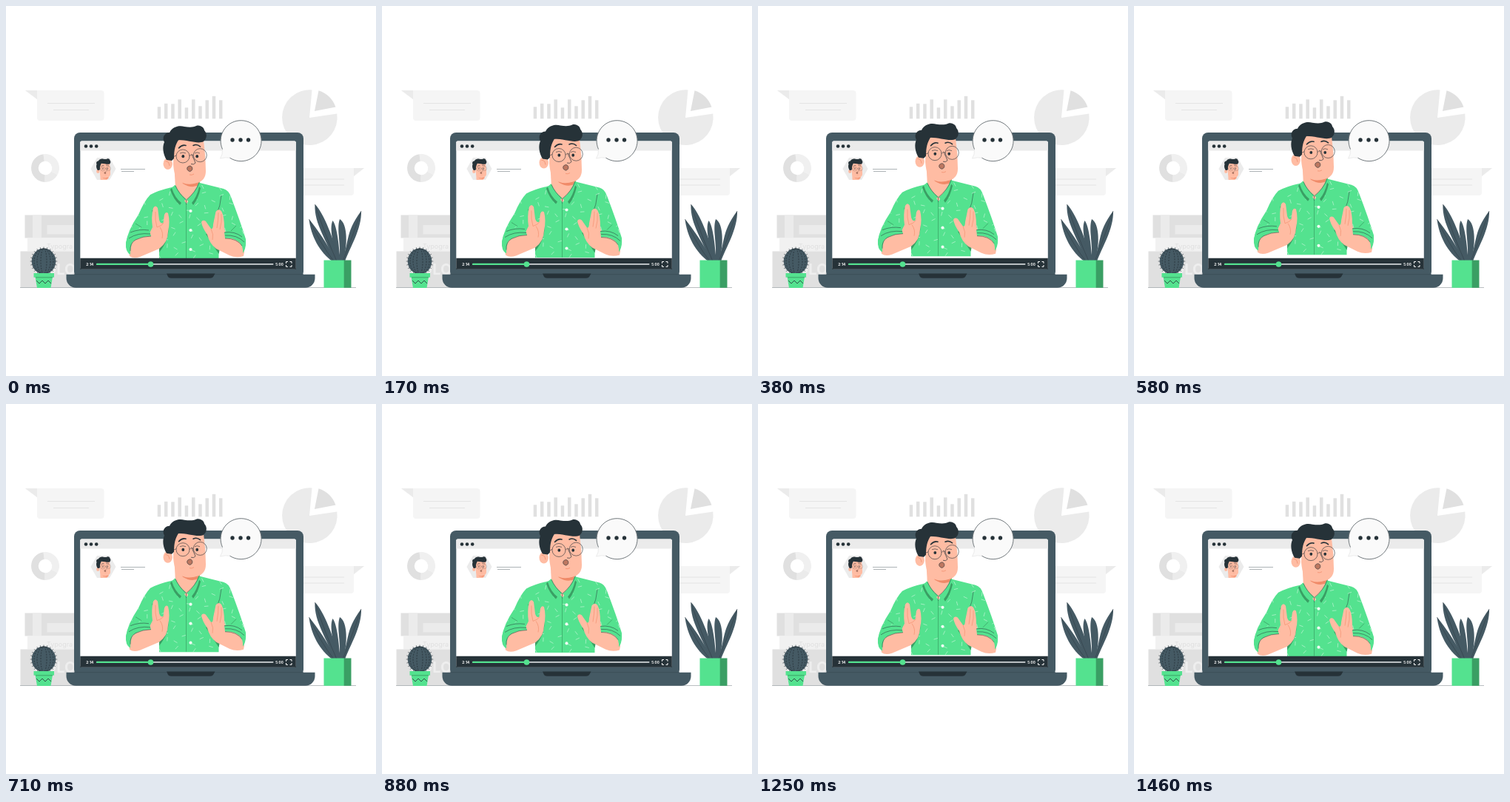
An HTML page with a canvas that plays this animation: 500x500 px, repeating every 1.5 s.

```html
<!DOCTYPE html>
<html lang="en">
<head>
<meta charset="utf-8">
<title>Video call</title>
<style>
html, body { margin: 0; width: 100%; height: 100%; overflow: hidden; background: #fff; }
canvas { display: block; width: 100vw; height: 100vh; }
</style>
</head>
<body>
<canvas id="stage"></canvas>
<script>
const canvas = document.getElementById('stage');
const scale = Math.max(1, window.devicePixelRatio || 1);
canvas.width = canvas.height = 500 * scale;
const ctx = canvas.getContext('2d');

const GREEN = '#54e28f', SHADE = '#3a9f64', SLATE = '#455a64', INK = '#263238';
const SKIN = '#ffbca3', BLUSH = '#f08a68';
const G1 = '#f5f5f5', G2 = '#ebebeb', G3 = '#e0e0e0';
const LOOP = 1500, STEP = LOOP / 36, RISE = 6.67;

function rect(x, y, w, h, color, r = 0) {
  ctx.fillStyle = color;
  ctx.beginPath();
  ctx.roundRect(x, y, w, h, r);
  ctx.fill();
}
function disc(x, y, r, color, ry = r) {
  ctx.fillStyle = color;
  ctx.beginPath();
  ctx.ellipse(x, y, r, ry, 0, 0, 7);
  ctx.fill();
}
function fill(d, color) {
  ctx.fillStyle = color;
  ctx.fill(new Path2D(d));
}
function line(d, color = INK, width = 0.6) {
  ctx.strokeStyle = color;
  ctx.lineWidth = width;
  ctx.stroke(new Path2D(d));
}
function text(str, x, y, font, color) {
  ctx.font = font;
  ctx.fillStyle = color;
  ctx.fillText(str, x, y);
}

function drawCharts() {
  fill('M26 114H128Q132.500 114 132.500 118V151Q132.500 155 128 155H46Q42 155 42 151V126Z', G1);
  fill('M26 114H42V126Z', G2);
  line('M56 131.500H120M64 140.500H112', G3, 0.8);

  fill('M392 219H484L470 230V252Q470 256 466 256H392Z', G1);
  fill('M484 219H470V230Z', G2);
  line('M402 234H457M402 242H457', G3, 0.8);

  [16, 20.5, 20, 26, 15, 26, 17, 25, 30.5, 25].forEach((h, i) =>
    rect(204.7 + i * 9.25, 152.3 - h, 4.5, h, G3));

  fill('M413.500 113.500L410 151L447.300 145.500A37.300 37.300 0 1 1 413.500 113.500Z', G2);
  fill('M422.500 114.300L417 142L445.500 136.500A37 37 0 0 0 422.500 114.300Z', G3);

  const slices = [[-1.7, 0.5, '#f0f0f0'], [0.5, 1.6, G2], [1.6, 4.58, G3]];
  for (const [from, to, color] of slices) {
    ctx.strokeStyle = color;
    ctx.lineWidth = 9.7;
    ctx.beginPath();
    ctx.arc(53, 219, 14.1, from, to);
    ctx.stroke();
  }
}

function drawBooks() {
  rect(25.5, 282.5, 70, 31, G3);
  rect(36, 282.5, 12, 31, G2);
  rect(55.5, 296, 40, 12.5, G2);
  rect(29, 313.5, 66, 18, '#f1f1f1');
  text('Typogra', 55, 327.500, '9px Inter, sans-serif', G3);
  rect(19.5, 331.5, 76, 49, G3);
  text('COLOR', 38, 362.500, '700 20px Inter, sans-serif', '#eeeeee');
}

function drawCactus() {
  disc(51, 345, 16.3, SLATE, 17.5);
  for (let i = 0; i < 24; i++) {
    const a = i * Math.PI / 12, c = Math.cos(a), s = Math.sin(a);
    line(`M${51 + 15 * c} ${345 + 16 * s}L${51 + 18.3 * c} ${345 + 19.5 * s}`, INK, 0.6);
  }
  for (const rx of [4, 9, 13]) {
    ctx.strokeStyle = INK;
    ctx.lineWidth = 0.8;
    ctx.setLineDash([2, 1.6]);
    ctx.beginPath();
    ctx.ellipse(51, 345, rx, 17, 0, 0, 7);
    ctx.stroke();
  }
  ctx.setLineDash([]);
  fill('M39.500 366H63L60.500 381H42Z', GREEN);
  rect(37.5, 361, 27.5, 5.7, GREEN);
  line('M40 366.800H63', SHADE, 0.9);
  line('M41 371L45 375L49 371L53 375L57 371L61 375', INK, 0.8);
}

function drawPlant() {
  fill('M441 345C424 333 412 311 409.500 288C420 301 436 323 445 344Z', SLATE);
  fill('M443 345C435 318 416 295 417.500 268C429 279 444 317 450 345Z', SLATE);
  fill('M446 345C444 325 436 301 441.500 290C448 298 450 327 452 345Z', SLATE);
  fill('M450 345C454 326 446 302 451 288C462 294 462 326 455 345Z', SLATE);
  fill('M453 345C465 319 457 308 480 277C481 301 464 328 458 345Z', SLATE);
  line('M409.500 288Q424 320 443 345M417.500 268Q431 309 447 345M480 277Q467 315 455 345', INK, 0.4);
  rect(429.5, 343.5, 27.500, 37.300, GREEN);
  rect(456.7, 343.5, 9.8, 37.300, SHADE);
}

function drawLaptop() {
  rect(92, 171, 310, 196, SLATE, 8);
  rect(100.3, 182.500, 291.500, 173, '#fff', 2);
  rect(100.3, 182.500, 291.500, 13, G2, [2, 2, 0, 0]);
  for (const x of [108, 115, 122.2]) disc(x, 189.5, 2.3, INK);
  line('M155 220.500H188M156 223.500H173', '#8a9397', 0.7);
}

function drawControls() {
  rect(100.3, 340.700, 291.500, 15, INK);
  text('2:14', 108.3, 350.7, '700 4.8px Inter, sans-serif', '#fff');
  text('5:00', 364.3, 350.5, '700 4.5px Inter, sans-serif', '#fff');
  rect(122, 348.1, 239.5, 1.6, '#cfd4d6', 0.8);
  rect(122, 347.7, 73, 2.4, GREEN, 1);
  disc(195.5, 349, 3.8, GREEN);
  line('M378.500 347.800V345.500H381M383.500 345.500H386V347.800M386 350V352.300H383.500M381 352.300H378.500V350', '#fff', 1);
  rect(81.5, 362.700, 336, 18, SLATE, [0, 0, 13, 13]);
  line('M92 362.700H402', '#394b54', 0.7);
  fill('M217 361.500H282.500L280 366Q279 367.700 276 367.700H223Q220 367.700 219 366Z', INK);
}

function drawHead() {
  fill('M227 210L229 247L244 267L262 240L260 225Z', SKIN);
  fill('M237 236Q246 244 262 237L262 241Q252 248 239 240Z', BLUSH);
  fill('M227 184Q246 174 267 182Q270 202 270 223Q270 236 258 239Q243 244 232 235Q227 228 226 214Z', SKIN);
  disc(218.7, 213.3, 6.2, SKIN, 7.8);
  line('M215.500 210Q220 209 221 216', BLUSH, 0.7);
  fill('M217 208C212 200 211 190 214 184C210 177 215 171 221 171C225 163 234 161 241 163C248 164 253 164 257 162C263 160 268 165 268 168C272 172 272 179 267 183C260 187 246 181 233 181C229 188 227 193 227 206L224 209Z', INK);

  ctx.lineCap = 'round';
  line('M233.500 192Q238 187 243 188.500M253 188.500Q258 186 262.500 190', INK, 1.6);
  ctx.lineCap = 'butt';
  disc(239.3, 203.2, 1.9, INK, 2.1);
  disc(258.2, 203.2, 1.9, INK, 2.1);
  line('M235 199Q239 197 243 199M255 199Q258 197 262 199', INK, 0.6);
  line('M251 201Q254 207 256 212Q254 215 250 213.500', INK, 0.7);
  ctx.strokeStyle = INK;
  ctx.lineWidth = 0.6;
  for (const [x, y] of [[239, 203], [262.3, 201.7]]) {
    ctx.beginPath();
    ctx.arc(x, y, 9, 0, 7);
    ctx.stroke();
  }
  line('M248 203Q250.500 199 253.300 202M230 202L221 206', INK, 0.6);
  fill('M245 218Q249 214 251.500 218Q253 222 248.500 223.700Q243.500 222 245 218Z', '#bd7760');
  line('M245 218Q249 214 251.500 218Q253 222 248.500 223.700Q243.500 222 245 218Z', INK, 0.6);
  line('M248 228Q251 229 254 227', BLUSH, 0.7);
}

const SHIRT = 'M224 245Q206 249 195 255Q187 263 179 282Q164 304 162 321Q162 328 167 330L207 312V341.500H287.500V312L320 329Q325 326 324 315Q317 292 304 258Q301 249 294 247L262 239L244 267L229 243Z';

// Scattered light stitches, spread by a low-discrepancy sequence.
function drawStitches() {
  ctx.save();
  ctx.clip(new Path2D(SHIRT));
  for (let i = 1; i < 95; i++) {
    const x = 162 + (i * 0.7549 % 1) * 163, y = 243 + (i * 0.5698 % 1) * 98;
    const a = i * 2.4, dx = 2.8 * Math.cos(a), dy = 2.8 * Math.sin(a);
    line(`M${x - dx} ${y - dy}L${x + dx} ${y + dy}`, '#b4f2cd', 0.8);
  }
  ctx.restore();
}

function drawPerson() {
  fill(SHIRT, GREEN);
  drawStitches();
  fill('M207 341V317L219 296Q222 314 207 333Z', SHADE);
  fill('M287.500 335L270 308L276 306L290 323Z', SHADE);
  line('M243.500 267V341', SHADE, 0.7);
  line('M291 256Q290 270 284 283M198 276Q199 287 207 297', INK, 0.5);
  for (const y of [277, 303, 329]) disc(249.5, y, 2.1, '#effcf4');

  drawHead();
  fill('M228 242L222 248Q226 261 235 269L243.500 261Q233 253 229 242Z', GREEN);
  fill('M222 248Q226 261 235 269L237 266Q228 259 224 246Z', SHADE);
  fill('M262 238L263 248Q260 261 253 269L244 262Q256 252 260 239Z', GREEN);
  fill('M263 246Q260 260 253 269L251 266Q258 258 261 244Z', SHADE);
  line('M229 243Q234 254 243.500 262Q256 252 261 239M243.500 262V268', INK, 0.5);

  fill('M169 317Q165 330 167 338Q172 342 181 339L207 328Q219 319 219 305Q222 291 219 280Q216 277 214 282L212.500 293Q209 295 207 289L205 273Q202 268 199 273Q196 285 198 299L193 309Z', SKIN);
  fill('M318 317Q324 329 321 338Q311 341 302 337L284 328Q275 321 272 309Q265 299 264 292Q266 288 270 291L277 301Q280 302 280 295L283.500 278Q287 273 291 277Q295 284 295 300Q296 307 300 311Z', SKIN);
  line('M202 278Q201 289 204 299Q211 297 213 293M208 299Q213 306 211 314', BLUSH, 0.6);
  line('M287 279Q287 289 285 300M291 281Q292 292 289 302M277 301Q281 309 279 316', BLUSH, 0.6);

  fill('M162 320Q164 310 169 304Q182 299 193 301L196 311Q181 311 171 319Q168 325 168 336Q161 332 162 320Z', GREEN);
  fill('M295 306Q306 302 317 307Q323 312 324 320Q324 329 320 334Q321 325 315 319Q307 313 296 314Z', GREEN);
  line('M168 306Q180 301 193 303M166 314Q178 306 195 308M168 331Q167 321 175 316Q185 311 196 311', INK, 0.5);
  line('M295 306Q309 304 319 312M296 310Q312 309 322 319M296 314Q312 314 319 324', INK, 0.5);
  line('M183 299L175 294M304 304L311 297', SHADE, 0.8);
}

function drawAvatar() {
  const hexagon = 'M114.500 220L123 205H140L148.500 220L140 235H123Z';
  fill(hexagon, G2);
  ctx.save();
  ctx.clip(new Path2D(hexagon));
  ctx.translate(131.500, 219);
  ctx.scale(0.33, 0.33);
  ctx.translate(-241, -200);
  drawHead();
  ctx.restore();
}

function drawBubble() {
  const shape = 'M292.500 193.500A27.500 27.500 0 1 1 302.500 205.200Q297 204 289.500 206Q293 201 292.500 193.500Z';
  fill(shape, '#fafafa');
  line(shape, G3, 0.6);
  line('M292.500 193.500A27.500 27.500 0 1 1 302.500 205.200', INK, 0.6);
  for (const x of [306, 317, 327.500]) disc(x, 181, 2.7, INK);
}

function draw(ms) {
  const time = Math.floor((ms % LOOP + 4) / STEP) * STEP % LOOP;
  const lift = RISE * (1 - Math.abs(1 - 2 * time / LOOP));
  ctx.setTransform(scale, 0, 0, scale, 0, 0);
  rect(0, 0, 500, 500, '#fff');
  drawCharts();
  drawBooks();
  line('M19 380.500H473', '#8a9397', 0.6);
  drawCactus();
  drawPlant();
  drawLaptop();
  drawAvatar();
  ctx.save();
  ctx.translate(0, -lift);
  drawPerson();
  ctx.restore();
  drawControls();
  drawBubble();
}

const start = performance.now();
function tick() {
  draw(performance.now() - start);
  requestAnimationFrame(tick);
}
tick();
</script>
</body>
</html>
```
